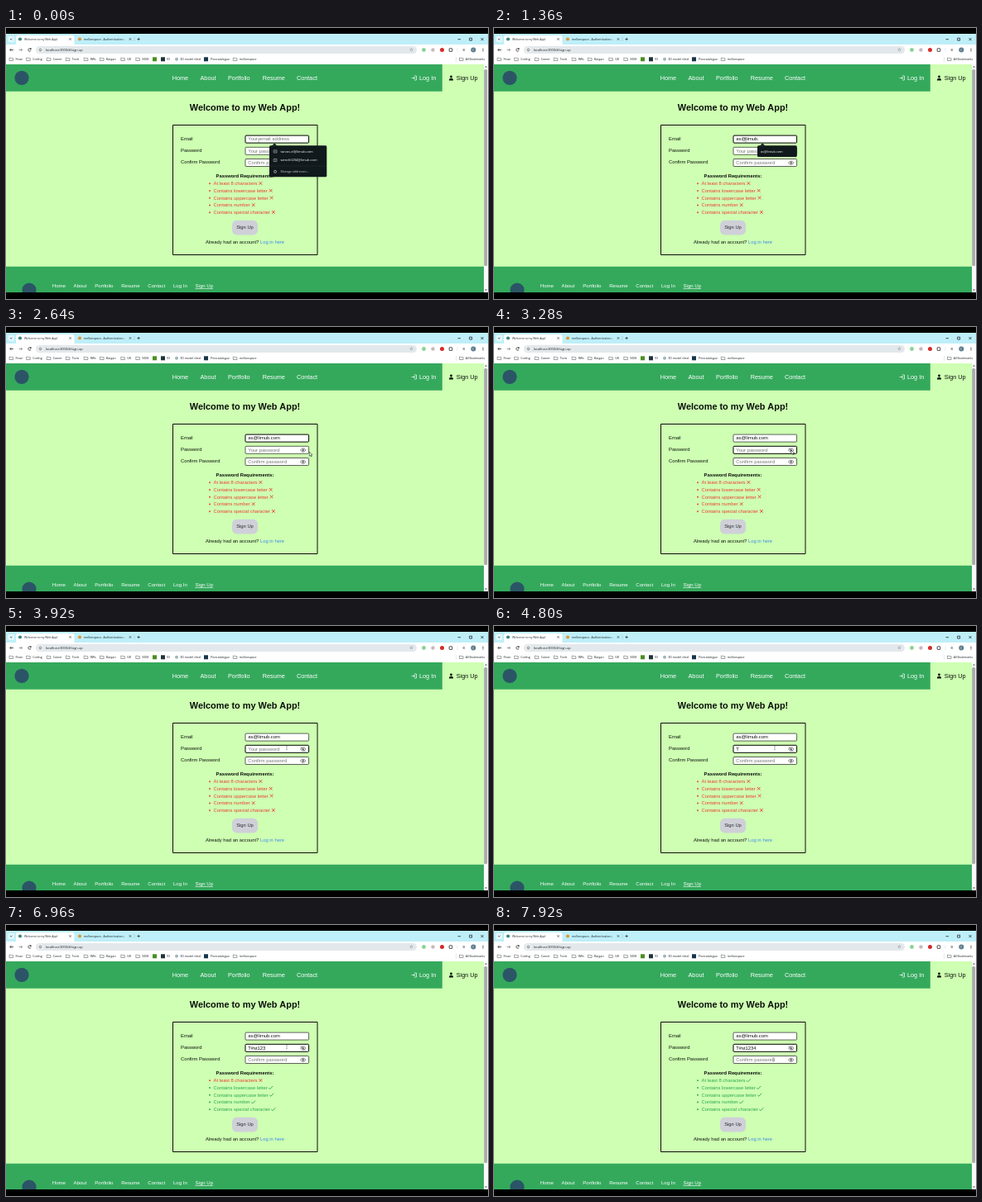
Animation, 582 px wide and 328 px high, one loop 8 s. Source, as an HTML page with a canvas:

```html
<!DOCTYPE html>
<html lang="en">
<head>
<meta charset="utf-8">
<title>Sign up</title>
<style>
html, body { margin: 0; width: 100%; height: 100%; overflow: hidden; background: #000; }
canvas { display: block; width: 582px; height: 328px; }
</style>
</head>
<body>
<canvas id="stage"></canvas>
<script>
const W = 582, H = 328, LOOP = 8000;
const canvas = document.getElementById('stage');
const g = canvas.getContext('2d');
const dpr = window.devicePixelRatio || 1;
canvas.width = W * dpr;
canvas.height = H * dpr;

const SANS = '"Liberation Sans", Arial, sans-serif';
const UI = '"Open Sans", "Noto Sans", sans-serif';
const GREEN = '#34a95c', PALE = '#ceffb2', RED = '#ee3a30', INK = '#0a0f0a';
const BODY = 5.82;

function rect(x, y, w, h, fill, r = 0) {
  g.fillStyle = fill;
  g.beginPath();
  g.roundRect(x, y, w, h, r);
  g.fill();
}
function frame(x, y, w, h, color, width = 1, r = 0) {
  g.strokeStyle = color;
  g.lineWidth = width;
  g.beginPath();
  g.roundRect(x, y, w, h, r);
  g.stroke();
}
function line(color, width, ...pts) {
  g.strokeStyle = color;
  g.lineWidth = width;
  g.beginPath();
  for (let i = 0; i < pts.length; i += 2) g.lineTo(pts[i], pts[i + 1]);
  g.stroke();
}
function disc(x, y, r, fill) {
  g.fillStyle = fill;
  g.beginPath();
  g.arc(x, y, r, 0, 7);
  g.fill();
}
function ring(x, y, r, color, width = 0.6, from = 0, to = 7) {
  g.strokeStyle = color;
  g.lineWidth = width;
  g.beginPath();
  g.arc(x, y, r, from, to);
  g.stroke();
}
// y is the middle of the capitals; returns the width.
function text(s, x, y, size = BODY, color = INK, { bold = false, align = 'left', font = SANS } = {}) {
  g.font = `${bold ? 'bold ' : ''}${size}px ${font}`;
  g.textAlign = align;
  g.fillStyle = color;
  g.fillText(s, x, y + size * 0.36);
  return g.measureText(s).width;
}
const ui = (s, x, y, color = '#1c2226', size = 3.5) => text(s, x, y, size, color, { font: UI });
function cross(x, y, r, color, width = 0.6) {
  line(color, width, x - r, y - r, x + r, y + r);
  line(color, width, x + r, y - r, x - r, y + r);
}
function folder(x, y) {
  line('#44494d', 0.5, x, y + 1.7, x, y - 1.7, x + 1.8, y - 1.7, x + 2.4, y - 1.1, x + 4.6, y - 1.1, x + 4.6, y + 1.7, x, y + 1.7);
}

function tabs() {
  rect(0, 7, W, 14, '#beeff9');
  rect(2.5, 9.7, 7.5, 7.6, '#e3f8fc', 2);
  line('#222', 0.7, 5, 13, 6.2, 14.2, 7.4, 13);
  rect(12, 9, 70.5, 12, '#fff', 2.5);
  disc(17, 13.5, 2.1, '#3c8a80');
  ui('Welcome to my Web App!', 22, 13.5, '#1c2226', 3.4);
  cross(77.5, 13.5, 1.2, '#222', 0.6);
  disc(89, 13.5, 2.1, '#dd9a3a');
  ui('mellonspace - Authentication -', 94, 13.5);
  cross(150, 13.5, 1.2, '#222', 0.6);
  line('#7fa9b5', 0.4, 155, 11, 155, 16);
  line('#222', 0.7, 158.4, 13.5, 161.8, 13.5);
  line('#222', 0.7, 160.1, 11.8, 160.1, 15.2);
  line('#111', 0.7, 545.5, 13.7, 549, 13.7);
  frame(559.7, 12.2, 2.9, 2.9, '#111', 0.7);
  cross(575, 13.6, 1.5, '#111', 0.7);
}

function toolbar() {
  rect(0, 20, W, 24, '#fff');
  line('#222', 0.7, 6.6, 24.7, 4.8, 26.5, 6.6, 28.3);
  line('#222', 0.7, 4.8, 26.5, 9, 26.5);
  line('#777c80', 0.7, 17.8, 24.7, 19.6, 26.5, 17.8, 28.3);
  line('#777c80', 0.7, 15.5, 26.5, 19.6, 26.5);
  ring(28.5, 26.5, 1.7, '#222', 0.7, 0.3, 5.6);
  rect(29.1, 24.5, 1.5, 1.4, '#222');
  rect(36, 22, 460, 9, '#e2e8eb', 4.5);
  disc(41.5, 26.5, 3, '#fff');
  ring(41.5, 26.5, 1.6, '#333', 0.6);
  line('#333', 0.5, 41.5, 26.2, 41.5, 27.4);
  ui('localhost:3000/#/sign-up', 47.7, 26.2, '#222', 3.9);
  text('☆', 489.5, 26.5, 5.5, '#222', { align: 'center', font: '"DejaVu Sans", sans-serif' });
  disc(504.5, 26.5, 2.4, '#8bd394');
  disc(515.5, 26.5, 2.2, '#c9b8bd');
  disc(526.5, 26.5, 2.5, '#d52b2b');
  frame(535.2, 24.8, 3.6, 3.6, '#222', 0.8, 0.5);
  line('#bcd', 0.4, 545, 24, 545, 29);
  text('≡', 553, 26.5, 5, '#222', { align: 'center' });
  disc(564.3, 26.5, 3, '#5d7c8c');
  ui('C', 563.2, 26.5, '#fff', 3.4);
  for (let i = -1; i < 2; i++) disc(576, 26.5 + i * 1.5, 0.6, '#222');

  const marks = [['Finan', 4], ['Coding', 24.7], ['Career', 49.3], ['Tools', 72.3], ['RWs', 94.2],
    ['Bargan', 113.5], ['GR', 138.8], ['5008', 156.8], ['mellonspace', 274.3]];
  for (const [name, x] of marks) {
    folder(x, 37.8);
    ui(name, x + 7.5, 37.8);
  }
  rect(177, 35.3, 5, 5, '#4b8f22');
  rect(187, 35.3, 5, 5, '#20343a');
  ui('V3', 194, 37.8);
  disc(206, 37.8, 2, '#9eb5bb');
  ui('3D model shed', 210.3, 37.8);
  rect(239, 35.3, 5, 5, '#17364a');
  ui('Pinecatalogue', 247, 37.8);
  line('#bcd', 0.4, 543.5, 35, 543.5, 41);
  folder(547.5, 37.8);
  ui('All Bookmarks', 554.7, 37.8);
}

function page() {
  rect(0, 44, 577, 276, PALE);
  rect(0, 44, 526.8, 32.8, GREEN);
  disc(19, 60.3, 8.6, '#2b5566');
  const nav = [['Home', 200.7], ['About', 234.5], ['Portfolio', 268], ['Resume', 309.8], ['Contact', 351], ['Log In', 499]];
  for (const [name, x] of nav) text(name, x, 60.2, 7.27, '#fff');
  text('Sign Up', 543.8, 60.2, 7.27);
  line('#fff', 0.7, 493, 58, 495.5, 58, 495.5, 63, 493, 63);
  line('#fff', 0.7, 489.7, 60.5, 493.7, 60.5);
  line('#fff', 0.7, 492.2, 59, 493.7, 60.5, 492.2, 62);
  disc(537.5, 59, 1.4, INK);
  rect(535, 61, 5, 2.4, INK, [1.8, 1.8, 0, 0]);

  text('Welcome to my Web App!', 288.5, 96.4, 10.9, INK, { bold: true, align: 'center' });
  frame(201.5, 117.5, 174.5, 157, INK, 1);
  text('Email', 211, 134.1);
  text('Password', 211, 148.2);
  text('Confirm Password', 211, 162.4);
  text('Password Requirements:', 288.5, 178.9, BODY, INK, { bold: true, align: 'center' });
  rect(273, 232.8, 31, 17.6, '#cfd0d8', 5.5);
  text('Sign Up', 288.5, 241.3, BODY, '#2b2b30', { align: 'center' });
  text('Already had an account?', 241, 259.4);
  text('Log in here', 307, 259.4, BODY, '#4189ee');

  rect(0, 288.8, 577, 31.2, GREEN);
  disc(28, 317, 8.6, '#2b5566');
  const foot = [['Home', 55.8], ['About', 81.6], ['Portfolio', 107.3], ['Resume', 139.2], ['Contact', 171.3], ['Log In', 202], ['Sign Up', 228.5]];
  for (const [name, x] of foot) text(name, x, 312.2, 6.06, '#fff');
  line('#fff', 0.6, 228.5, 315.5, 250, 315.5);

  rect(577, 44, 5, 276, '#fafafa');
  rect(577.2, 50, 3.9, 238, '#a9aba9', 1.6);
  for (const [y, d] of [[46.7, 1], [317.3, -1]]) {
    g.fillStyle = '#777';
    g.beginPath();
    g.moveTo(578, y + d);
    g.lineTo(581, y + d);
    g.lineTo(579.5, y - d);
    g.fill();
  }
}

function eye(x, y, slashed) {
  const color = '#333';
  g.strokeStyle = color;
  g.lineWidth = 0.7;
  g.beginPath();
  g.moveTo(x - 3.1, y);
  g.quadraticCurveTo(x, y - 4.2, x + 3.1, y);
  g.quadraticCurveTo(x, y + 4.2, x - 3.1, y);
  g.stroke();
  disc(x, y, 1, color);
  if (slashed) {
    line('#fff', 0.7, x - 2.2, y - 2.9, x + 3, y + 2.3);
    line(color, 0.7, x - 2.7, y - 2.6, x + 2.6, y + 2.7);
  }
}

function field(y, value, hint, focused, caret) {
  rect(289, y - 4.5, 76.6, 9, '#fff', 1);
  frame(289, y - 4.5, 76.6, 9, focused ? '#000' : '#2a302a', focused ? 1 : 0.75, 1);
  const w = text(value || hint, 292.3, y - 0.2, BODY, value ? INK : '#727672');
  if (caret) {
    const x = 292.6 + (value ? w : 0);
    line('#000', 0.5, x, y - 3, x, y + 3);
  }
}

function rule(i, label, ok) {
  const y = 188 + i * 8.74, color = ok ? '#2aa552' : RED;
  disc(246, y + 0.3, 0.95, color);
  const x = 250.5 + text(label, 250.5, y, BODY, color) + 3.9;
  if (ok) line(color, 0.9, x - 2.5, y + 0.2, x - 0.9, y + 1.8, x + 2.5, y - 1.7);
  else cross(x, y, 1.8, color, 0.9);
}

function popup(t) {
  const full = t < 80;
  if (!full && (t < 320 || t >= 1760)) return;
  g.fillStyle = '#10191b';
  g.beginPath();
  g.moveTo(321, 142.6);
  g.lineTo(324.2, 139.6);
  g.lineTo(327.4, 142.6);
  g.fill();
  rect(318, 142.3, full ? 69.3 : 47.8, full ? 38 : 13.8, '#10191b', 1.5);
  if (!full) return ui(EMAIL, 322, 149.3, '#fff', 3.9);
  for (const [s, y] of [['tarvos.el@limub.com', 149.4], ['wendril204@limub.com', 160]]) {
    frame(323.2, y - 1.6, 3.8, 3.2, '#cfd5d5', 0.5);
    line('#cfd5d5', 0.4, 324, y, 326.2, y);
    ui(s, 331.5, y, '#fff', 4);
  }
  line('#30393b', 0.4, 318, 167, 387, 167);
  ring(325, 173.8, 1.5, '#cfd5d5', 0.7);
  ui('Manage addresses...', 331.5, 173.8, '#c5cccc', 3.6);
}

const EMAIL = 'as@limub.com';
const EMAIL_KEYS = [80, 80, 320, 640, 800, 960, 1040, 1200, 1320, 1440, 1600, 1680];
const PASSWORD = 'T#st1234';
const PASS_KEYS = [4720, 5440, 5920, 6240, 6480, 6640, 6880, 7120];
const typed = (s, keys, t) => s.slice(0, keys.filter(k => k <= t).length);

const RULES = [
  ['At least 8 characters', s => s.length >= 8],
  ['Contains lowercase letter', s => /[a-z]/.test(s)],
  ['Contains uppercase letter', s => /[A-Z]/.test(s)],
  ['Contains number', s => /\d/.test(s)],
  ['Contains special character', s => /[^\w]/.test(s)]
];

const PATH = [[0, 305, 136.5], [600, 304, 136], [1920, 304, 136], [2560, 366.3, 151.2], [2720, 366.3, 151.2],
  [3040, 359, 149], [3280, 359, 149], [3680, 339, 147.5], [7360, 339, 147.5], [7760, 337, 162.8], [LOOP, 337, 162.8]];

function pointerAt(t) {
  const i = PATH.findIndex(p => p[0] > t);
  const [t0, x0, y0] = PATH[i - 1], [t1, x1, y1] = PATH[i];
  const u = (t - t0) / (t1 - t0), e = u * u * (3 - 2 * u);
  return [x0 + (x1 - x0) * e, y0 + (y1 - y0) * e];
}

function pointer(t) {
  const [x, y] = pointerAt(t);
  const overText = x > 289 && x < 354 && FIELDS.some(c => Math.abs(y - c) < 4.6);
  if (overText) {
    line('#666', 0.5, x, y - 2.2, x, y + 2.2);
    for (const d of [-2.2, 2.2]) line('#666', 0.5, x - 0.8, y + d, x + 0.8, y + d);
    return;
  }
  g.beginPath();
  for (const [dx, dy] of [[0, 0], [0, 5], [1.2, 4], [2, 5.8], [2.9, 5.4], [2.1, 3.6], [3.7, 3.5]]) g.lineTo(x + dx, y + dy);
  g.closePath();
  g.fillStyle = '#fff';
  g.fill();
  g.strokeStyle = '#000';
  g.lineWidth = 0.5;
  g.stroke();
}

const FIELDS = [134.6, 148.8, 163];

function draw(t) {
  g.setTransform(dpr, 0, 0, dpr, 0, 0);
  rect(0, 0, W, H, '#000');
  tabs();
  toolbar();
  page();

  const pass = typed(PASSWORD, PASS_KEYS, t);
  const toggled = t >= 3200;
  field(FIELDS[0], typed(EMAIL, EMAIL_KEYS, t), 'Your email address', !toggled, false);
  field(FIELDS[1], pass, 'Your password', toggled, t >= 5900 && t < 6400);
  field(FIELDS[2], '', 'Confirm password', false, false);
  eye(358.7, FIELDS[1] + 0.2, toggled);
  eye(358.7, FIELDS[2] + 0.2, false);
  // The checks trail the typing slightly.
  const checked = typed(PASSWORD, PASS_KEYS, t - 160);
  RULES.forEach(([label, test], i) => rule(i, label, test(checked)));
  popup(t);
  pointer(t);
  rect(0, 320, W, 8, '#000');
}

function tick() {
  draw(performance.now() % LOOP);
  requestAnimationFrame(tick);
}
tick();
</script>
</body>
</html>
```
